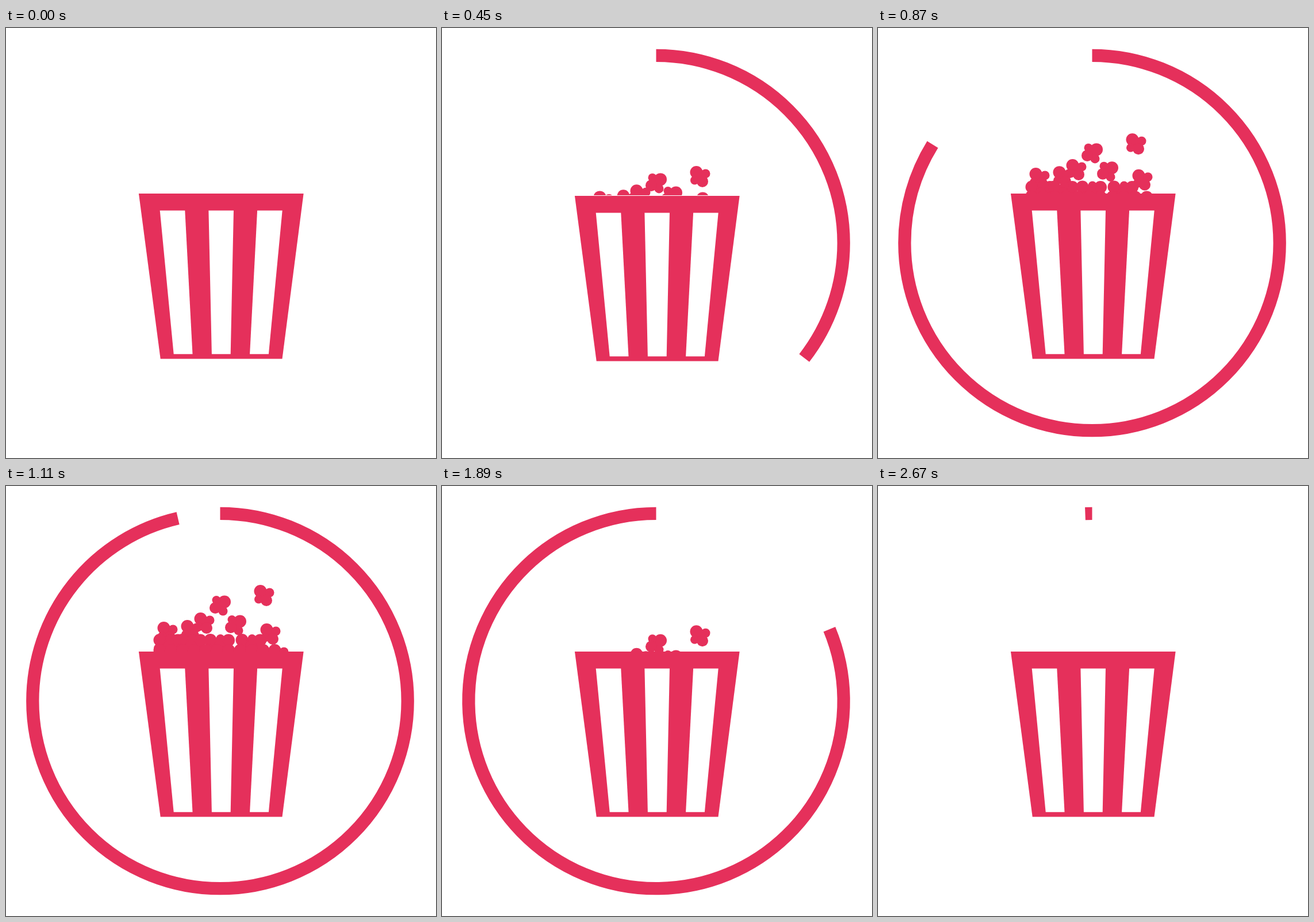
Write an HTML page with a canvas that moves like this. It is 748x748 px and loops after 2.7 s.

```html
<!DOCTYPE html>
<html lang="en">
<head>
<meta charset="utf-8">
<title>Popcorn loader</title>
<style>
  html, body { margin: 0; width: 100%; height: 100%; overflow: hidden; background: #fff; }
  canvas { display: block; width: 748px; height: 748px; }
</style>
</head>
<body>
<canvas id="stage" width="748" height="748"></canvas>
<script>
const ctx = document.getElementById('stage').getContext('2d');
const SIZE = 748, LOOP = 2700, STEP = 30, RED = '#e5305b', WHITE = '#fff';
const RIM = 291, REF_TIME = 1110, TURN = Math.PI * 2;

// A kernel stands at (x, y) at REF_TIME; gravity is in px per s²
const kernel = (x, y, quarters, peak, gravity) => ({ x, y, quarters, peak, gravity });

// Higher kernels peak later and are thrown harder
function flying(x, y, quarters = 0) {
  const lift = 258 - y;
  return kernel(x, y, quarters, 1130 + lift / 2, 100 + lift / 2);
}
const heaped = (x, y, quarters = 0) => kernel(x, y, quarters, 1180, 93);

const kernels = [
  flying(449, 190), flying(373, 208, 1), flying(281, 254), flying(345, 238),
  flying(400, 242, 1), flying(460, 257), flying(322, 251)
];
for (const mound of [283, 322, 371, 426]) {
  kernels.push(heaped(mound - 9, 275), heaped(mound + 9, 275, 1));
}
for (let x = 274; x <= 474; x += 20) kernels.push(heaped(x, 293));

// Ease curve with control points (x1, 0) and (x2, 1)
function ease(x, x1, x2) {
  if (x <= 0) return 0;
  if (x >= 1) return 1;
  let lo = 0, hi = 1;
  for (let i = 0; i < 30; i++) {
    const u = (lo + hi) / 2, v = 1 - u;
    if (3 * v * v * u * x1 + 3 * v * u * u * x2 + u * u * u < x) lo = u; else hi = u;
  }
  return lo * lo * (3 - 2 * lo);
}

function disc(x, y, r) {
  ctx.beginPath();
  ctx.arc(x, y, r, 0, TURN);
  ctx.fill();
}

// Upright trapezoid, centred on topX above and bottomX below
function trapezoid(color, topX, topY, topWidth, bottomX, bottomY, bottomWidth) {
  ctx.fillStyle = color;
  ctx.beginPath();
  ctx.moveTo(topX - topWidth / 2, topY);
  ctx.lineTo(topX + topWidth / 2, topY);
  ctx.lineTo(bottomX + bottomWidth / 2, bottomY);
  ctx.lineTo(bottomX - bottomWidth / 2, bottomY);
  ctx.fill();
}

function drawRing(t) {
  const end = ease(t / 1350, 0.333, 0.43);
  const start = ease((t - 1350) / 1380, 0.597, 0.666);
  if (end <= start) return;
  ctx.strokeStyle = RED;
  ctx.lineWidth = 22.3;
  ctx.beginPath();
  ctx.arc(372.5, 374, 326.2, (start - 0.25) * TURN, (end - 0.25) * TURN);
  ctx.stroke();
}

function drawKernel({ x, y, quarters, peak, gravity }, t) {
  const fall = time => gravity * ((time - peak) / 1000) ** 2;
  ctx.save();
  ctx.translate(x, y + fall(t) - fall(REF_TIME));
  ctx.rotate(quarters * TURN / 4);
  disc(0, 0, 11);
  disc(-6.5, -7, 11);
  disc(9.5, -4.5, 8);
  disc(-9.5, 7, 7.5);
  disc(4, 9, 10);
  ctx.restore();
}

function drawPopcorn(t) {
  ctx.save();
  ctx.beginPath();
  ctx.rect(0, 0, SIZE, RIM);
  ctx.clip();
  ctx.fillStyle = RED;
  kernels.forEach(k => drawKernel(k, t));
  ctx.restore();
}

function drawBucket(t) {
  const phase = (t - 270) / 360;
  const dip = phase > 0 && phase < 1 ? 4 * Math.sin(phase * Math.PI) ** 2 : 0;
  ctx.save();
  ctx.translate(0, dip);
  trapezoid(RED, 374.3, 288, 286.7, 374.6, 575.5, 211.8);
  for (const side of [-1, 0, 1]) {
    trapezoid(WHITE, 374.2 + side * 84.7, 317.4, 43.6, 374.3 + side * 66.2, 567.2, 32.8);
  }
  ctx.restore();
}

function draw(now) {
  const t = Math.floor((now % LOOP) / STEP) * STEP;
  ctx.fillStyle = WHITE;
  ctx.fillRect(0, 0, SIZE, SIZE);
  drawRing(t);
  drawPopcorn(t);
  drawBucket(t);
}

let origin = null;
function tick(now) {
  if (origin === null) origin = now;
  draw(Math.max(0, now - origin));
  requestAnimationFrame(tick);
}
draw(0);
requestAnimationFrame(tick);
</script>
</body>
</html>
```
